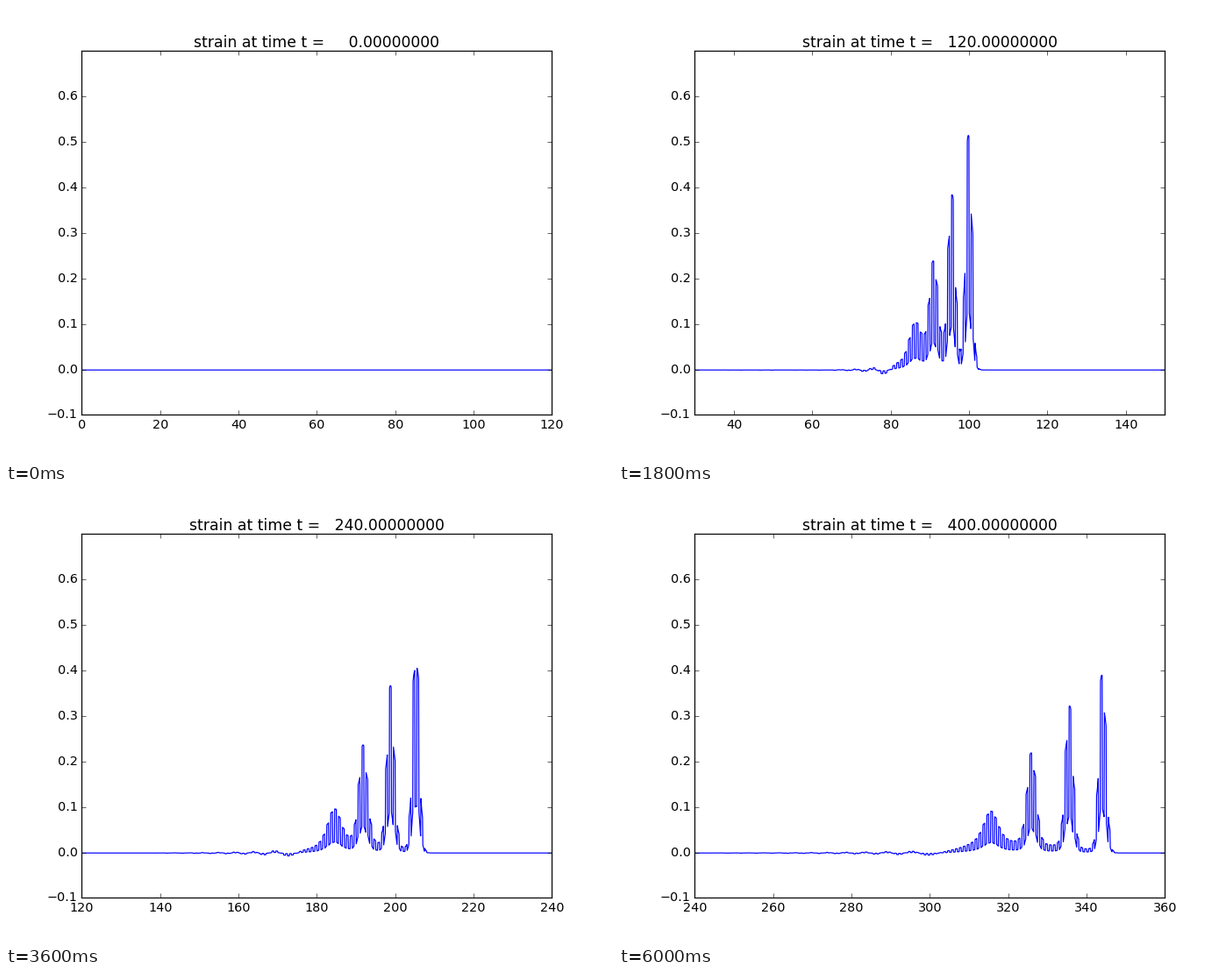
A matplotlib script that plays this animation: 692 px wide and 519 px high, repeating every 6.15 s.

```python
"""Strain waves in a layered nonlinear elastic bar, driven by a moving wall."""
import numpy as np
import matplotlib.pyplot as plt
from matplotlib.animation import FuncAnimation
from matplotlib.ticker import MultipleLocator
from matplotlib.transforms import Affine2D

W, H = 692, 519
FRAMES, INTERVAL = 41, 150
T_STEP = 10.0             # model time between frames
LENGTH, CELLS = 360, 12   # bar length, cells per layer pair
DT = 0.05
DAMPING = 0.003           # small viscous relaxation time
VIEW = 120.0


def wall_speed(t):
    """One smooth pull on the left end of the bar."""
    return -0.1 * (1 + np.cos(np.pi * (t - 10) / 10)) if t < 20 else 0.0


def simulate():
    """Return cell centres and the strain at each frame (staggered leapfrog)."""
    dx = 1 / CELLS
    x = (np.arange(LENGTH * CELLS) + 0.5) * dx
    stiff = np.where(x % 1 < 0.5, 4.0, 1.0)   # modulus and density alike
    push = DT / dx / (0.5 * (stiff[1:] + stiff[:-1]))

    strain = np.zeros_like(x)
    stress = np.zeros_like(x)
    speed = np.zeros(x.size + 1)
    states = [strain.copy()]
    per_frame = round(T_STEP / DT)

    for n in range((FRAMES - 1) * per_frame):
        speed[1:-1] += push * np.diff(stress)
        speed[0] = wall_speed((n + 0.5) * DT)
        rate = np.diff(speed) / dx
        strain += DT * rate
        stress = np.expm1(stiff * strain)
        stress += DAMPING * stiff * (1 + stress) * rate
        if (n + 1) % per_frame == 0:
            states.append(strain.copy())
    return x, states


plt.style.use("classic")
plt.rcParams.update({
    "font.family": "DejaVu Sans",
    "figure.facecolor": "white",
    "savefig.dpi": "figure",
})

x, states = simulate()

fig = plt.figure(figsize=(8, 6), dpi=W / 8)
ax = fig.add_axes([86.45 / W, 52.55 / H, 536 / W, 415 / H])
line, = ax.plot(x, states[0], "b-", lw=1)
# The frame snaps to whole pixels, the curve does not.
line.set_transform(ax.transData + Affine2D().translate(0, -0.6))
ax.set_ylim(-0.1, 0.7)
ax.set_yticks(np.arange(-1, 7) / 10)
ax.xaxis.set_major_locator(MultipleLocator(20))
title = ax.set_title("", pad=4)


def draw(i):
    t = i * T_STEP
    left = max(0.0, 0.75 * t - 60)
    ax.set_xlim(left, left + VIEW)
    line.set_ydata(states[i])
    title.set_text("strain at time t = %14.8f" % t)
    return line, title


anim = FuncAnimation(fig, draw, frames=FRAMES, interval=INTERVAL,
                     repeat=True, repeat_delay=0, blit=False)
plt.show()
```
